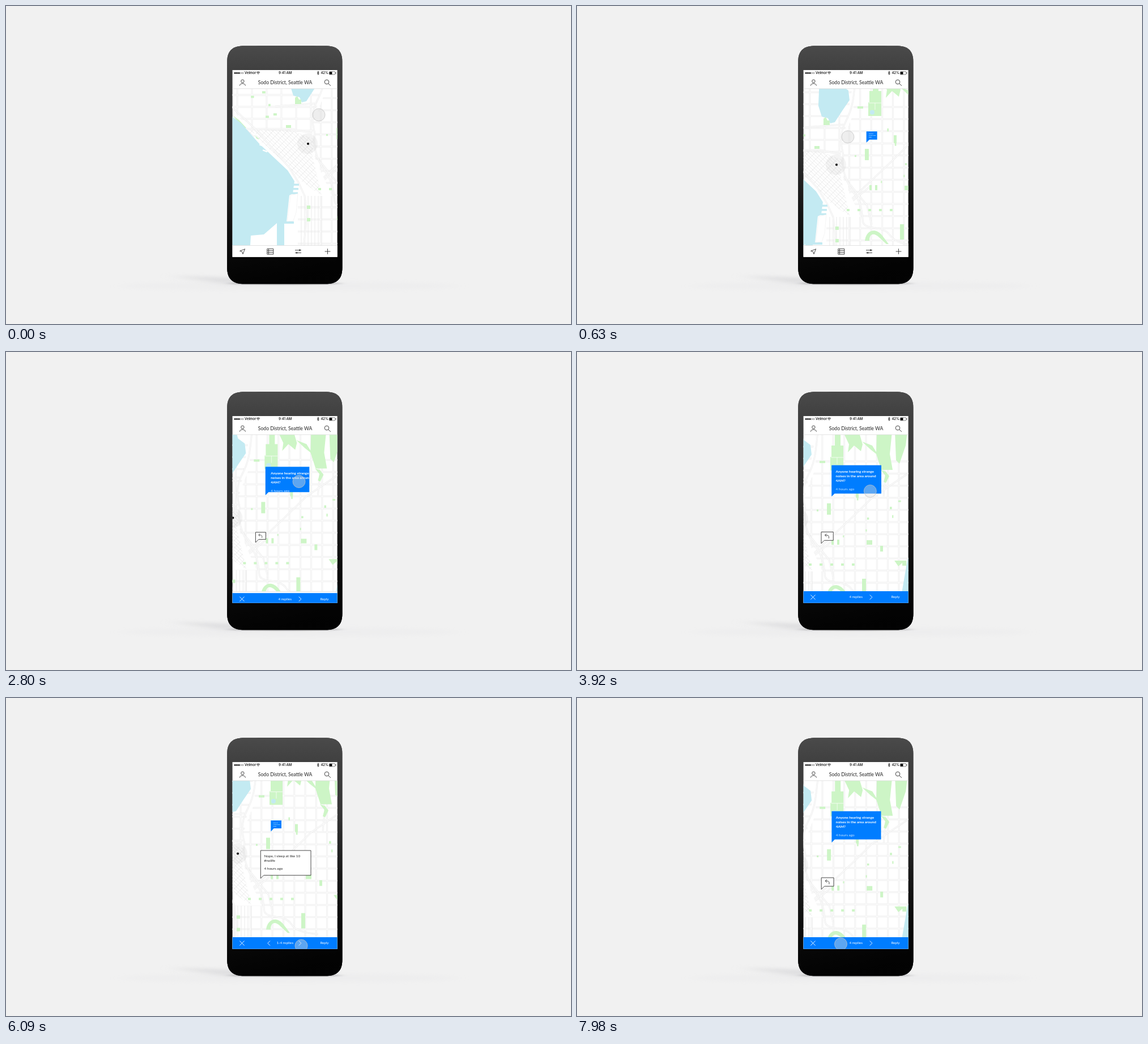
An HTML page that plays this animation: 997x561 px, repeating every 8000 ms.

```html
<!DOCTYPE html>
<html lang="en">
<head>
<meta charset="utf-8">
<title>Neighbourhood map</title>
<style>
html, body { margin: 0; width: 100%; height: 100%; overflow: hidden; background: #f1f1f1; }
svg { display: block; width: 100vw; height: 100vh; }
text { font-family: Lato, sans-serif; font-size: 6.4px; }
.status text { font-family: Inter, Roboto, sans-serif; font-size: 6px; font-weight: 500; }
.line { fill: none; stroke: #333; stroke-width: .9; }
.bar .line { stroke: #fff; }
.bar text, #post text { fill: #fff; }
.land { fill: #cdf5c6; }
.water { fill: #c3eaf2; }
.case { fill: none; stroke: #ebebeb; stroke-width: 2.8; }
.road { fill: none; stroke: #fdfdfd; stroke-width: 1.3; }
.thin { fill: none; stroke: #e8e8e8; stroke-width: .9; }
#tiny text { font-size: 2.3px; }
</style>
</head>
<body>
<svg viewBox="0 0 997 561" preserveAspectRatio="none">
<defs>
  <linearGradient id="shell" x1="0" y1="0" x2="0" y2="1">
    <stop offset="0" stop-color="#4a4a4a"/><stop offset=".1" stop-color="#404040"/>
    <stop offset=".5" stop-color="#2b2b2b"/><stop offset=".9" stop-color="#131313"/>
    <stop offset="1" stop-color="#0e0e0e"/>
  </linearGradient>
  <linearGradient id="shade" gradientUnits="userSpaceOnUse" x1="470" y1="240" x2="540" y2="470">
    <stop offset="0" stop-color="#000" stop-opacity="0"/><stop offset="1" stop-color="#000" stop-opacity=".85"/>
  </linearGradient>
  <filter id="soft" x="-50%" y="-200%" width="200%" height="500%"><feGaussianBlur stdDeviation="14 3"/></filter>
  <filter id="tight" x="-50%" y="-300%" width="200%" height="700%"><feGaussianBlur stdDeviation="7 1.2"/></filter>
  <clipPath id="screen"><rect x="399.6" y="113" width="185" height="329.8"/></clipPath>
  <clipPath id="mapArea"><rect x="399" y="146" width="186" height="276.5"/></clipPath>
  <clipPath id="downtown"><path d="M343 254H422L470 272 465 299 482 372 445 345 425 322 372 274Z"/></clipPath>
  <clipPath id="east"><path d="M487 131H660V470H440V372H500L470 305 468 240 488 190Z"/></clipPath>
  <clipPath id="north"><path d="M320 131H488L466 262 355 254 320 215Z"/></clipPath>
  <clipPath id="postClip"><rect id="postBox"/></clipPath>
</defs>

<rect width="997" height="561" fill="#f1f1f1"/>
<ellipse cx="500" cy="494" rx="300" ry="8" fill="#e6e6e8" opacity=".3" filter="url(#soft)"/>
<path d="M290 476L420 480V490H390Z" fill="#cfcfd1" opacity=".55" filter="url(#soft)"/>
<ellipse cx="492" cy="489.5" rx="100" ry="2.2" fill="#8d8d90" opacity=".6" filter="url(#tight)"/>
<g id="body">
  <path id="frame" d="M418 70.3C450 69.8 534 69.8 566 70.3 585 71 593.4 80 593.4 98V462C593.4 480 585 489.6 567 490.2H417C399 489.6 390.2 480 390.2 462V98C390.2 80 399 71 418 70.3Z" fill="url(#shell)"/>
  <use href="#frame" style="fill:url(#shade)"/>
  <path d="M418 70.3C450 69.8 534 69.8 566 70.3 585 71 593.4 80 593.4 98V462C593.4 480 585 489.6 567 490.2H417C399 489.6 390.2 480 390.2 462V98C390.2 80 399 71 418 70.3Z" fill="url(#shade)"/>
</g>

<g clip-path="url(#screen)">
  <rect x="399" y="113" width="187" height="331" fill="#fff"/>
  <g clip-path="url(#mapArea)">
    <g id="map">
      <g id="streets"></g>
      <path id="blocks" class="land"/>
      <g class="land">
        <path d="M522 131H532V150H537V194H514V170H516V150H522Z"/>
        <path d="M539 131H566L571 148 568 160 556 150 545 162 547 148Z"/>
        <path d="M570 143L588 150 599 168 585 157Z"/>
        <path d="M596 125H623L619 165 624 193H604L595 165Z"/>
        <path d="M628 125H650L647 150 636 182 630 176Z"/>
        <path d="M603 193L612 196 618 204 612 216 608 214 611 203Z"/>
        <path d="M627 353H648V362H641V357L634 363Z"/>
        <path d="M508 414C510 396 526 390 538 404L550 420H546L533 408C525 400 516 400 516 414Z"/>
        <path d="M325 230L336 238 349 252 344 253ZM364 265L372 272 369 274Z"/>
      </g>
      <path class="water" d="M428 125H463L467 140 479 149 481 166 468 185 455 205 447 207 443 198 432 195 426 176Z"/>
      <path class="land" d="M435 199L439 196 442 202H446V210H435Z"/>
      <circle class="water" cx="521" cy="187.5" r="4"/>
      <path d="M515 171H537M526 171V183" stroke="#fff" stroke-width=".7" fill="none"/>
      <path class="water" d="M655 340L650 352 640 410H660V340Z"/>
      <path class="water" d="M310 222L340 244 372 280 422 327 434 346 431 368 425 371 420 417H433V421H416V465H403V420L380 440 357 442 356 459 310 465Z"/>
      <g id="piers"></g>
      <path d="M427 371L440 368 437 401 432 416 421 417Z" fill="#fff" stroke="#eee" stroke-width=".6"/>
      <circle cx="457" cy="280" r="18" fill="#000" opacity=".045"/>
      <circle cx="458" cy="280" r="2" fill="#000"/>
    </g>
  </g>

  <g class="status">
    <g id="signal"></g>
    <text x="421" y="120.4">Velmor</text>
    <path d="M442 117.2Q445 114.8 448 117.2M443.2 118.7Q445 117.2 446.8 118.7M444.5 120.2H445.5" class="line" style="stroke:#000"/>
    <text x="492.7" y="120.4" text-anchor="middle">9:41 AM</text>
    <path d="M549 116.5L552.3 119.6 550.7 121.3V115L552.3 116.6 549 119.8" class="line" style="stroke:#000;stroke-width:.7"/>
    <text x="555.4" y="120.4">42%</text>
    <rect x="570.3" y="115.7" width="10.6" height="5.2" rx="1" class="line" style="stroke-width:.6"/>
    <path d="M570.8 116.2H575.4V120.4H570.8ZM581.5 117.3H582.3V119.3H581.5Z"/>
  </g>
  <text x="492.6" y="138.3" text-anchor="middle" style="font-size:8.6px" fill="#222">Sodo District, Seattle WA</text>
  <g class="line">
    <circle cx="417.4" cy="132.7" r="2.7"/>
    <path d="M412.4 140.6C412.6 135.5 422.2 135.5 422.4 140.6"/>
    <circle cx="566" cy="134" r="3.8"/><path d="M568.8 136.8L573 140.8"/>
  </g>
  <path d="M399 145.8H585" stroke="#dcdcdc" stroke-width=".8"/>

  <rect x="399" y="422.3" width="187" height="21" fill="#fff"/>
  <path d="M399 422.5H585" stroke="#dcdcdc" stroke-width=".8"/>
  <g class="line">
    <path d="M412.6 432.3L421.6 428.7 418 437.6 416.7 433.4Z"/>
    <path d="M460.8 428.4H471.8V438H460.8ZM460.8 431.6H471.8M460.8 434.8H471.8M463.4 428.4V438"/>
    <path d="M510 430.8H521M510 435.4H521M562.6 433H572.4M567.5 428.1V437.9"/>
    <path d="M517.2 430.8H519.4M512 435.4H514.2" style="stroke-width:2.4"/>
  </g>

  <g id="reply">
    <path id="replyShape" fill="#fff" stroke="#333" stroke-width=".9"/>
    <path id="replyIcon" class="line" d="M3.4 4V1.5C3.4-1.2 2-1.8-3.4-1.8M-.6-4.4L-3.5-1.8-.6.9"/>
    <g id="replyText" fill="#222">
      <text x="6.2" y="11.6">Nope, I sleep at like 10</text>
      <text x="6.2" y="19.7">#nolife</text>
      <text x="6.2" y="34.3">4 hours ago</text>
    </g>
  </g>

  <g id="post">
    <path id="postShape" fill="#007dff"/>
    <g id="tiny" font-weight="700">
      <text x="4" y="5">Heard it</text>
      <text x="4" y="7.9">a while back</text>
      <text x="4" y="10.8">today</text>
    </g>
    <g clip-path="url(#postClip)"><g id="postText">
      <g font-weight="700">
        <text y="13.2">Anyone hearing strange</text>
        <text y="21.2">noises in the area around</text>
        <text y="29.2">4AM?</text>
      </g>
      <text y="44" opacity=".8">4 hours ago</text>
    </g></g>
  </g>

  <g id="bar" class="bar">
    <rect x="399" y="422" width="187" height="25" fill="#007dff"/>
    <path class="line" d="M412.3 428.4L420.5 436.7M420.5 428.4L412.3 436.7M516.7 428.4L520.8 432.5 516.7 436.7"/>
    <path id="prev" class="line" d="M466 428.4L461.9 432.5 466 436.7"/>
    <text id="count" x="492.3" y="434.4" text-anchor="middle"></text>
    <text x="554.4" y="434.4" style="font-size:6.2px">Reply</text>
  </g>
  <circle id="touch" r="11" stroke="#c2c2c2" stroke-opacity=".8" stroke-width=".9"/>
</g>
</svg>

<script>
const LOOP = 8000, STEP = 70;
const $ = id => document.getElementById(id);
const set = (id, attrs) => { for (const k in attrs) $(id).setAttribute(k, attrs[k]); };
const clamp = x => Math.min(1, Math.max(0, x));
const span = (t, a, b) => clamp((t - a) / (b - a));
const mix = (a, b, p) => a.map((v, i) => v + (b[i] - v) * p);
const repeat = (n, make) => Array.from({ length: n }, (_, i) => make(i)).join('');

const inOut = p => p < .5 ? 4 * p ** 3 : 1 - 4 * (1 - p) ** 3;
const out = p => 1 - (1 - p) ** 2.75;
const backHalf = x => x * x * (3.2 * x - 2.2) / 2;
const back = p => p < .5 ? backHalf(2 * p) : 1 - backHalf(2 - 2 * p);

function seeded(seed) {
  return () => (seed = (seed * 16807) % 2147483647) / 2147483647;
}

const grid = (x, dx, y, dy) =>
  repeat(14, i => `M${x + i * dx} 125V470`) + repeat(16, i => `M310 ${y + i * dy}H665`);

const road = (d, clip) =>
  `<g${clip ? ` clip-path="url(#${clip})"` : ''}><path class="case" d="${d}"/><path class="road" d="${d}"/></g>`;

function buildMap() {
  // downtown blocks run parallel to the shore
  const at = (u, n) => `${372 + u * .72 + n * .69} ${280 + u * .69 - n * .72}`;
  const hatch = repeat(28, i => `M${at(-70, i * 4.3 - 6)}L${at(170, i * 4.3 - 6)}`)
    + repeat(28, i => `M${at(i * 9 - 70, -8)}L${at(i * 9 - 70, 112)}`);
  const diagonals = 'M462 362L548 281 588 242 650 200M470 300L512 352 520 386M486 344L520 316M596 160L612 200 608 240';
  const shore = 'M320 212L365 254 425 322 441 348 452 372 456 405 450 465';
  const freeway = 'M492 125C488 160 488 178 474 204 462 228 466 246 470 262 466 284 472 304 486 326'
    + ' 504 350 502 362 505 382 510 396 540 386 552 404 560 416 575 420 600 422';

  $('streets').innerHTML = road(grid(333, 26, 152, 21), 'north') + road(grid(480.5, 19.3, 178, 21.4), 'east')
    + `<path class="thin" clip-path="url(#downtown)" d="${hatch}"/>`
    + `<path class="thin" clip-path="url(#east)" d="${repeat(7, i => `M${446 + i * 6} 372V465`)}"/>`
    + road('M345 254H430L466 262M400 214L470 209') + road(diagonals, 'east') + road(shore) + road(freeway);

  // a few large blocks, a row of pocket parks, then scattered ones
  const rand = seeded(11);
  const box = (x, y, w, h) => `M${x} ${y}h${w}v${h}h${-w}z`;
  $('blocks').setAttribute('d', box(508, 252, 7, 20) + box(559, 228, 5, 14) + box(570, 385, 7, 27)
    + box(578, 317, 10, 8) + box(602, 327, 5, 10) + box(419, 247, 9, 5) + box(495, 177, 10, 4)
    + repeat(2, i => box(516 + i * 10, 316, 4, 9) + box(456, 389 + i * 22, 6, 6))
    + repeat(5, i => box(476 + i * 19, 358, 5, 4))
    + repeat(10, () => box(490 + rand() * 150, 205 + rand() * 130, 2 + rand() * 3, 3 + rand() * 3))
    + repeat(5, () => box(340 + rand() * 60, 186 + rand() * 55, 3 + rand() * 3, 4)));

  $('piers').innerHTML = repeat(4, i =>
    `<path d="M${361 + i * 5.7} ${262 + i * 9.7}l8 3" stroke="#fff" stroke-width="2.2"/>`)
    + repeat(3, i => `<rect class="water" x="428" y="${350.5 + i * 7.5}" width="${14 - i}" height="3.4"/>`);
  $('signal').innerHTML = repeat(5, i =>
    `<circle cx="${404.2 + i * 3.4}" cy="118.3" r="1.2" stroke="#000" stroke-width=".4" fill="${i < 3 ? '#000' : '#fff'}"/>`);
}

function bubble([x, y, w, h]) {
  const tail = 5.4 * clamp(w / 15);
  return `M${x} ${y}h${w}v${h}h${tail - w}l${-tail} ${tail}z`;
}

function touchAt(t) {
  if (t < 1260) return mix([552, 192], [474, 233], inOut(span(t, 0, 820)));
  if (t < 3000) return mix([474, 233], [517, 228.5], inOut(span(t, 1260, 2310)));
  if (t < 7000) return mix([517, 228.5], [521, 437], inOut(span(t, 3710, 4480)));
  return mix([521, 437], [465.5, 434], inOut(span(t, 7000, 7350)));
}

function draw(t) {
  const drag = inOut(span(t, 0, 820));
  const drift = inOut(span(t, 980, 1820));
  const open = out(span(t, 2590, 3010));
  const thread = back(span(t, 4900, 5740)) - inOut(span(t, 7210, 8100));

  const start = mix(mix([75, -37], [-4, 2], drag), [-4, -2], drift);
  const [mx, my] = mix(mix(start, [-67, 15], open), [-49, -5.5], thread);
  set('map', { transform: `translate(${mx} ${my})` });

  const pin = [start[0] + 510.7, start[1] + 221.3, 19, 14.3];
  const post = mix(mix(pin, [449.2, 199.7, 87.8, 50], open), [467.3, 216, 18.7, 14], thread);
  const [px, py, pw, ph] = post;
  const textOn = span(t, 2630, 2770) * (1 - span(t, 4900, 5110) + span(t, 7700, 7910));
  set('postShape', { d: bubble(post) });
  set('postBox', { x: px, y: py, width: pw, height: ph });
  set('postText', { transform: `translate(${px + 7.4 + (1 - open) * 14} ${py + .2 + (1 - open) * 3})`, opacity: textOn });
  set('tiny', { transform: `translate(${px} ${py})`, opacity: clamp((32 - pw) / 10) });

  const reply = mix(mix([494, 321, 0, 0], [431, 317.5, 21.2, 14.8], open), [449.3, 269, 88.7, 43.8], thread);
  const [rx, ry, rw, rh] = reply;
  const visibility = open > 0 ? 'visible' : 'hidden';
  set('reply', { visibility });
  set('replyShape', { d: bubble(reply) });
  set('replyIcon', {
    transform: `translate(${rx + rw / 2 - .6} ${ry + rh / 2}) scale(${Math.min(1, rw / 21)})`,
    opacity: clamp((45 - rw) / 18)
  });
  set('replyText', { transform: `translate(${rx} ${ry})`, opacity: span(t, 5530, 5810) * (1 - span(t, 7210, 7420)) });

  const paging = t >= 4970 && t < 7350;
  set('bar', { transform: `translate(0 ${(1 - open) * 22})`, visibility });
  set('prev', { opacity: paging ? 1 : 0 });
  $('count').textContent = paging ? '1-4 replies' : '4 replies';

  const [cx, cy] = touchAt(t);
  const pressed = t < 910 || [2520, 4690, 7350].some(a => t >= a && t < a + 140);
  set('touch', { cx, cy, fill: `rgba(222,222,222,${pressed ? .52 : .42})` });
}

buildMap();
let begin;
function tick(now) {
  begin ??= now;
  draw(Math.floor((now - begin) % LOOP / STEP) * STEP);
  requestAnimationFrame(tick);
}
draw(0);
requestAnimationFrame(tick);
</script>
</body>
</html>
```
